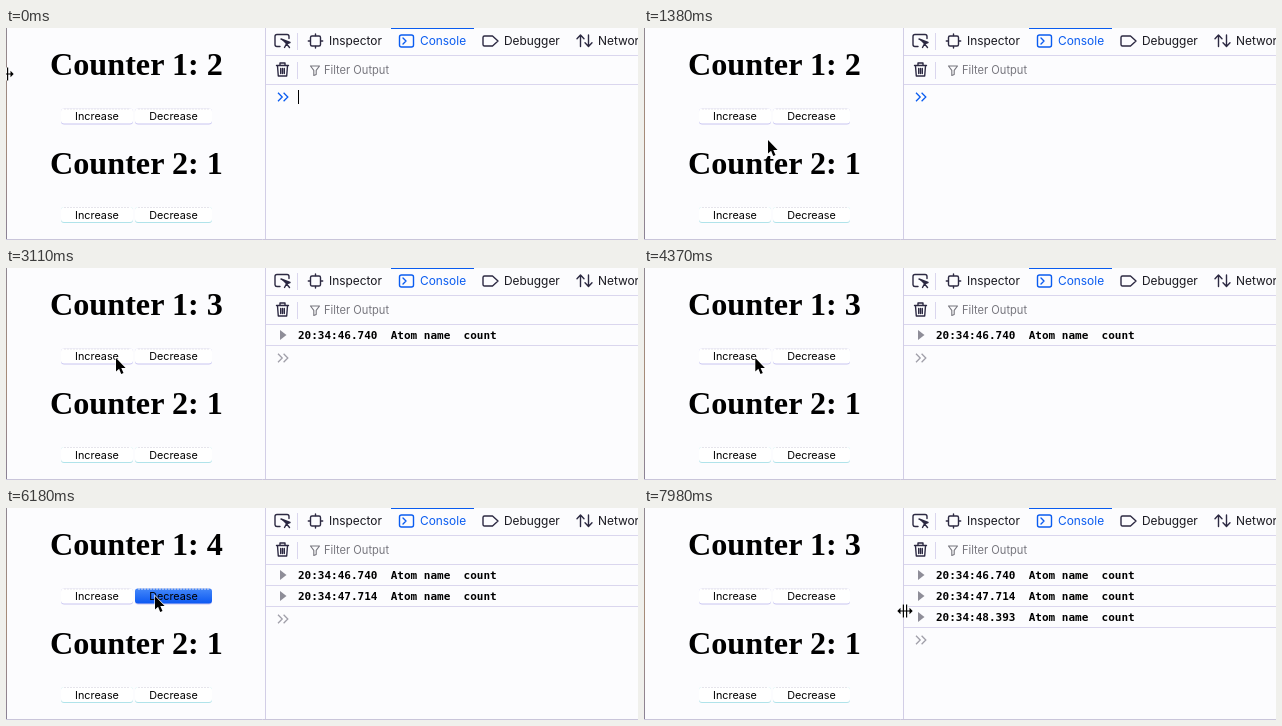
An HTML page for the animation above (8000 ms loop, 632x212 px).

```html
<!DOCTYPE html>
<html lang="en">
<head>
<meta charset="utf-8">
<title>Counters with console</title>
<style>
  html, body { margin: 0; width: 100%; height: 100%; overflow: hidden; background: #fcfcfe; }
  svg { display: block; width: 100%; height: 100%; }
  text { white-space: pre; }
  .head { font: bold 32.2px "Liberation Serif", serif; fill: #000; }
  .label { font: 10.8px Inter, sans-serif; text-anchor: middle; fill: #000; }
  .tab { font: 11.9px Inter, sans-serif; fill: #18171f; }
  .filter { font: 11.1px Inter, sans-serif; fill: #77767e; }
  .log { font: bold 11px "DejaVu Sans Mono", monospace; fill: #000; }
  .icon { fill: none; stroke: #2c2942; stroke-width: 1.4; stroke-linejoin: round; stroke-linecap: round; }
  .active { stroke: #0a5cf0; }
  .rule { fill: none; stroke: #dad6ee; }
</style>
</head>
<body>
<svg viewBox="0 0 632 212">
  <defs>
    <linearGradient id="edge" x2="0" y2="1">
      <stop stop-color="#8f8791"/><stop offset=".5" stop-color="#a68b78"/><stop offset="1" stop-color="#8b8296"/>
    </linearGradient>
    <linearGradient id="pressed" x2="0" y2="1">
      <stop stop-color="#4488fa"/><stop offset="1" stop-color="#0c58f2"/>
    </linearGradient>
  </defs>
  <rect width="632" height="212" fill="#fcfcfe"/>
  <rect width="1" height="212" fill="url(#edge)"/>
  <path d="M0 211.5H632" stroke="#c9c5da"/>

  <text class="head" id="count1" x="44" y="47.4"></text>
  <text class="head" x="44" y="146.4">Counter 2: 1</text>
  <g id="buttons"></g>

  <path class="rule" d="M260 27.5H632M260 56.5H632M291.5 5V22M291.5 34V51"/>
  <path d="M259.5 0V211" stroke="#d2cee6"/>
  <rect x="385" width="83" height="1" fill="#0a5cf0"/>

  <g class="icon">
    <path d="M274 18.5H271Q269 18.5 269 16.5V8.5Q269 6.5 271 6.5H281Q283 6.5 283 8.5V10.5"/>
    <path d="M275 11L284 14.5L280.5 15.9L283.5 19.5M280.5 15.9L278.5 19.5Z" fill="#2c2942"/>
    <rect x="304.5" y="8" width="10" height="10" rx="1.5"/>
    <path d="M309.5 6V7.5M309.5 18.5V20M302.3 13H304M315 13H316.7"/>
    <path d="M478.5 8H486.5L492 13L486.5 18H478.5Q477 18 477 16.5V9.5Q477 8 478.5 8Z"/>
    <path d="M574.5 18.5V7.5M571 10.7L574.5 7L578 10.7M582.5 7V18M579 14.8L582.5 18.5L586 14.8"/>
    <path d="M270.5 37.5H282.5M274 37V35H279V37M271.5 38L272.3 48H280.7L281.5 38M274.7 40.5V45.5M276.5 40.5V45.5M278.3 40.5V45.5"/>
  </g>
  <g class="icon active">
    <rect x="393.5" y="7" width="14" height="12" rx="2"/>
    <path d="M397 10L400 13L397 16"/>
  </g>
  <path class="icon" style="stroke:#77767e;stroke-width:1.1" d="M304.5 38H313.5L310.2 42.3V46.5L307.8 47.5V42.3Z"/>

  <text class="tab" x="323" y="17">Inspector</text>
  <text class="tab" x="414" y="17" style="fill:#0a5cf0">Console</text>
  <text class="tab" x="498" y="17">Debugger</text>
  <text class="tab" x="592" y="17">Network</text>
  <text class="filter" x="318" y="46">Filter Output</text>

  <g id="logs"></g>
  <path id="prompt" fill="none" stroke-width="1.3" d="M272 -4.2L276.2 0L272 4.2M277.6 -4.2L281.8 0L277.6 4.2"/>
  <path id="caret" d="M292.5 62V76" stroke="#000"/>

  <path id="arrow" d="M0 0V13.6L3.1 10.8L5.2 16L7.5 15L5.3 10H9.6Z" fill="#000" stroke="#fff" stroke-width="1.2" paint-order="stroke"/>
  <g id="resize">
    <path d="M-1.6 -6.5V6.5M1.6 -6.5V6.5M-6 0H6" stroke="#fff" stroke-width="3"/>
    <path d="M-1.6 -6.5V6.5M1.6 -6.5V6.5M-6 0H6" stroke="#000" stroke-width="1.2"/>
    <path d="M-7.7 0L-4.5 -3.2V3.2ZM7.7 0L4.5 -3.2V3.2Z"/>
  </g>
</svg>
<script>
const LOOP = 8000;
const byId = id => document.getElementById(id);

const clicks = [
  { button: 0, down: 2400, up: 2640, count: 3, stamp: "20:34:46.740" },
  { button: 0, down: 4560, up: 4800, count: 4, stamp: "20:34:47.714" },
  { button: 1, down: 6040, up: 6360, count: 3, stamp: "20:34:48.393" }
];

// time, x, y of the pointer
const route = [
  [0, 0, 46], [280, 0, 46], [750, 62, 72], [1250, 124, 112], [1600, 124, 112],
  [2250, 110, 90], [4250, 110, 90], [4900, 117, 90], [5120, 135, 90],
  [5700, 148, 89], [6000, 149, 88], [6450, 149, 88], [6980, 173, 87],
  [7580, 258, 105], [7900, 261, 103], [8000, 261, 103]
];

function makeButton(x, y, width, label, glow) {
  byId("buttons").insertAdjacentHTML("beforeend", `<g>
    <rect x="${x}" y="${y}" width="${width}" height="16" rx="3" fill="${glow}"/>
    <rect class="face" x="${x}" y="${y}" width="${width}" height="15" rx="3" fill="#fff"/>
    <path d="M${x + 3} ${y + .5}h${width - 6}" stroke="#e5e4eb" stroke-dasharray="2 1"/>
    <text class="label" x="${x + width / 2}" y="${y + 11.5}">${label}</text></g>`);
}
for (const [y, glow] of [[80.5, "#c9c5f1"], [179, "#b0e3ea"]]) {
  makeButton(55, y, 72, "Increase", glow);
  makeButton(129, y, 77, "Decrease", glow);
}
const faces = document.querySelectorAll(".face");

clicks.forEach((click, i) => {
  const y = 67 + 21 * i;
  byId("logs").insertAdjacentHTML("beforeend", `<g>
    <path d="M274 ${y - 5}L280.5 ${y}L274 ${y + 5}Z" fill="#8e8d98"/>
    <text class="log" x="292" y="${y + 4}">${click.stamp}  Atom name  count</text>
    <path class="rule" d="M260 ${y + 10.5}H632"/></g>`);
});
const logs = byId("logs").children;

const show = (el, on) => el.setAttribute("visibility", on ? "visible" : "hidden");

function pointerAt(t) {
  const i = route.findIndex(step => step[0] > t);
  const [t0, x0, y0] = route[i - 1], [t1, x1, y1] = route[i];
  const k = (t - t0) / (t1 - t0);
  return [x0 + (x1 - x0) * k, y0 + (y1 - y0) * k];
}

function draw(t) {
  const done = clicks.filter(c => t >= c.up);
  const held = clicks.find(c => t >= c.down && t < c.up);
  const focused = t < clicks[0].down;

  byId("count1").textContent = "Counter 1: " + (done.length ? done.at(-1).count : 2);
  faces.forEach((face, i) =>
    face.setAttribute("fill", held && held.button === i ? "url(#pressed)" : "#fff"));
  clicks.forEach((c, i) => show(logs[i], t >= c.up));

  const prompt = byId("prompt");
  prompt.setAttribute("transform", `translate(0 ${69 + 21 * done.length})`);
  prompt.setAttribute("stroke", focused ? "#0a5cf0" : "#a09fa9");
  show(byId("caret"), focused && (t < 800 || t >= 1950));

  const [x, y] = pointerAt(t);
  const resizing = x < 4 || x > 256;
  show(byId("arrow"), !resizing);
  show(byId("resize"), resizing);
  byId(resizing ? "resize" : "arrow").setAttribute("transform", `translate(${x} ${y})`);
}

const start = performance.now();
function tick() {
  draw((performance.now() - start) % LOOP);
  requestAnimationFrame(tick);
}
tick();
</script>
</body>
</html>
```
